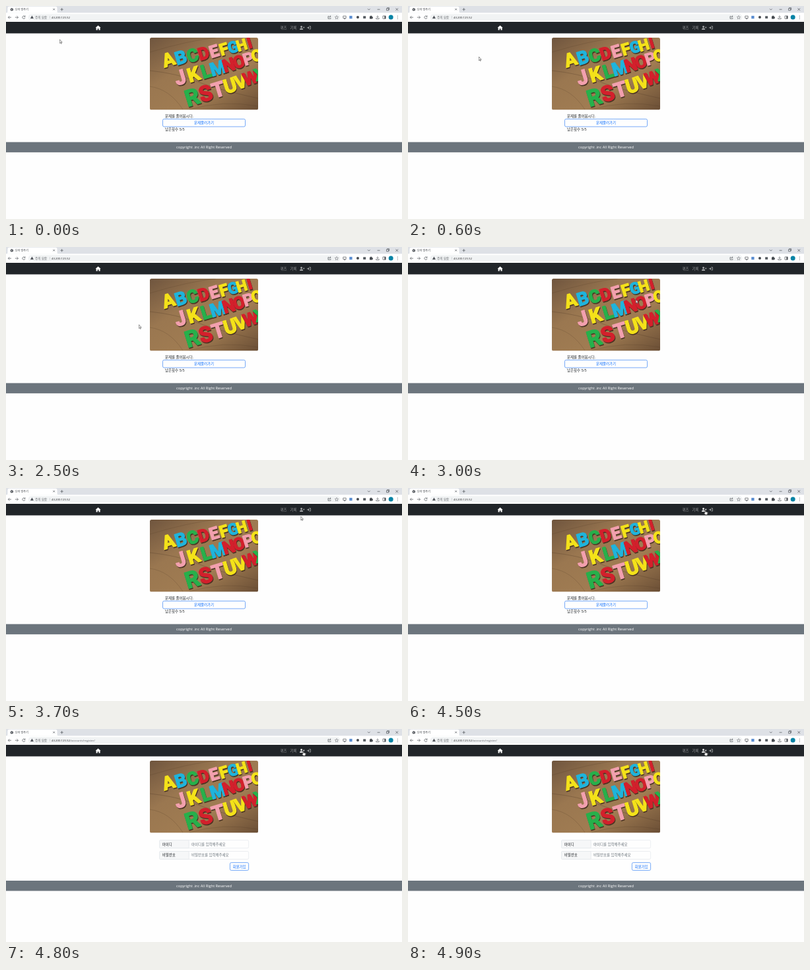
These frames come from a looping animation (600x323 px, 5 s). An HTML page:

```html
<!DOCTYPE html>
<html>
<head>
<meta charset="utf-8">
<title>단어 맞추기</title>
<style>
html, body { margin: 0; width: 100%; height: 100%; overflow: hidden; background: #fefefe; }
svg { display: block; width: 600px; height: 323px; }
text { font: 5.45px "Open Sans", "Noto Sans CJK KR", "Noto Sans CJK", sans-serif; fill: #212529; }
.mid { text-anchor: middle; }
.tab { font-size: 4.1px; fill: #45494d; }
.url { font-size: 4.3px; fill: #202124; }
.soft { fill: #6c757d; }
.blue { fill: #0d6efd; }
.link { fill: #a0a2a4; }
.line { fill: none; stroke: #50545a; stroke-width: .7; }
.btn { fill: #fefefe; stroke: #3d86f5; stroke-width: .7; }
.letter { font: 700 27px Roboto, sans-serif; text-anchor: middle; stroke-linejoin: round; stroke-width: 1.6; }

/* page states */
.home, .load, .done, .reg, .nav, .arrow, .hand, .lit, .shift, .move { animation: 5s step-end infinite; }
.home { animation-name: home; }
.load { animation-name: load; }
.done { animation-name: done; }
.reg { animation-name: reg; }
.nav { animation-name: nav; }
.shift { animation-name: shift; }
.arrow { animation-name: arrow; }
.hand { animation-name: hand; }
.lit { animation-name: lit; }
.move { animation-name: move; }
@keyframes home { 0% { visibility: visible } 94%, 100% { visibility: hidden } }
@keyframes load { 0% { visibility: hidden } 94% { visibility: visible } 96%, 100% { visibility: hidden } }
@keyframes done { 0% { visibility: hidden } 96%, 100% { visibility: visible } }
@keyframes reg { 0% { visibility: hidden } 94%, 100% { visibility: visible } }
@keyframes nav { 0% { visibility: visible } 94% { visibility: hidden } 96%, 100% { visibility: visible } }
@keyframes shift { 0% { transform: none } 94% { transform: translateY(-17.5px) } 96%, 100% { transform: none } }
@keyframes arrow { 0% { visibility: visible } 80%, 100% { visibility: hidden } }
@keyframes hand { 0% { visibility: hidden } 80%, 100% { visibility: visible } }
@keyframes lit { 0% { fill: #a0a2a4 } 80%, 100% { fill: #e4e5e6 } }

/* pointer route, advancing every 100 ms */
@keyframes move {
  0% { transform: translate(81px, 50.7px); animation-timing-function: steps(6) }
  12% { transform: translate(107px, 77px) }
  18% { transform: translate(108.3px, 78px) }
  20% { transform: translate(108.3px, 78px); animation-timing-function: steps(4) }
  28% { transform: translate(112px, 78px) }
  30% { transform: translate(112px, 78px); animation-timing-function: steps(4) }
  38% { transform: translate(117.3px, 79px) }
  40% { transform: translate(117.3px, 79px); animation-timing-function: steps(5) }
  50% { transform: translate(201px, 117.7px) }
  52% { transform: translate(208.5px, 117px); animation-timing-function: steps(6) }
  64% { transform: translate(413px, 61px); animation-timing-function: steps(2) }
  68% { transform: translate(446px, 47.8px) }
  70% { transform: translate(446px, 47.8px); animation-timing-function: steps(2) }
  74% { transform: translate(446.3px, 43px); animation-timing-function: steps(3) }
  80% { transform: translate(448.5px, 31px) }
  82% { transform: translate(448.5px, 32.3px) }
  86%, 100% { transform: translate(448.5px, 33px) }
}
</style>
</head>
<body>
<svg viewBox="0 0 600 323">
  <defs>
    <linearGradient id="wood" x1="0" y1="0" x2="1" y2="1">
      <stop offset="0" stop-color="#6f553e"/>
      <stop offset=".35" stop-color="#9a7750"/>
      <stop offset=".65" stop-color="#a07c52"/>
      <stop offset="1" stop-color="#6a4e35"/>
    </linearGradient>
    <clipPath id="frame"><rect width="164" height="109.5" rx="2.6"/></clipPath>
  </defs>
  <rect width="600" height="323" fill="#fefefe"/>

  <!-- browser -->
  <rect width="600" height="10.5" fill="#dee1e6"/>
  <path d="M0 10.5Q2.5 10.5 2.5 8V3Q2.5 .8 5 .8H75Q77.5 .8 77.5 3V8Q77.5 10.5 80 10.5Z" fill="#fff"/>
  <circle cx="8.8" cy="5.2" r="2.3" fill="#53575c"/>
  <path d="M7.2 4.5l1.4.5.2 1.3M9.2 3.6l1.2 1" fill="none" stroke="#fff" stroke-width=".6"/>
  <text class="tab home" x="14" y="6.5">단어 맞추기</text>
  <text class="tab load" x="14" y="6.5" style="font-size:3.7px">43.200.125.52/accounts/register</text>
  <text class="tab done" x="14" y="6.5">단어 맞추기</text>
  <path class="line" d="M71.3 3.8l2.6 2.6m0-2.6l-2.6 2.6M82.4 5.2h4.4M84.6 3v4.4M548 4.2l1.8 1.8 1.8-1.8M562.6 5.2h4M576.6 3.7h3v3h-3ZM577.6 3.7v-1h3v3h-1M590.5 3.3l3.6 3.6m0-3.6l-3.6 3.6"/>
  <rect y="10.5" width="600" height="13.5" fill="#fff"/>
  <rect x="33.5" y="12.3" width="473" height="9.6" rx="4.8" fill="#f1f3f4"/>
  <path class="line" d="M8 17.2H3.4m2-2.1l-2.1 2.1 2.1 2.1M13.8 17.2h4.6m-2-2.1l2.1 2.1-2.1 2.1"/>
  <g class="nav"><path class="line" d="M28.6 15.8a2.1 2.1 0 1 0 .4 1.9M29 14.5v1.7h-1.8"/></g>
  <g class="load"><path class="line" d="M25.2 15.4l3.6 3.6m0-3.6l-3.6 3.6"/></g>
  <path d="M39.4 14.6l2.5 4.5h-5Z" fill="#50545a"/>
  <text class="url" x="44" y="18.8" style="font-size:4.6px;fill:#5f6368">주의 요함</text>
  <path d="M66.4 15v4.2" stroke="#b5b8bc" stroke-width=".5"/>
  <text class="url" x="69" y="18.7">43.200.125.52<tspan class="reg" fill="#5f6368">/accounts/register/</tspan></text>
  <path class="line" d="M489.6 15.6h-1.6v3.6h4v-1.3M489.6 17.7q.2-2 2.4-2m-1-1.1l1.2 1.1-1.2 1.1"/>
  <path class="line" d="M501 14.6l.8 1.7 1.8.2-1.3 1.3.3 1.8-1.6-.9-1.6.9.3-1.8-1.3-1.3 1.8-.2Z" style="stroke-width:.5"/>
  <path class="line" d="M510.8 15.2h4.4v3.2h-4.4ZM512 19.6h2.4M571 15h4.2v4.2H571ZM563 14.4v3.2m-1.5-1.4l1.5 1.5 1.5-1.5M560.8 18v1.5h4.4V18"/>
  <rect x="520.3" y="14.9" width="4.3" height="4.3" fill="#5a8dd0"/>
  <circle cx="533" cy="17.1" r="2" fill="#464a50"/>
  <rect x="541.2" y="15.3" width="4" height="3.6" fill="#555a60"/>
  <path d="M551 15.5h1.2a.9.9 0 0 1 1.8 0h1.2v1.3a.9.9 0 0 1 0 1.8v1H551Z" fill="#464a50"/>
  <path d="M573.4 15h1.8v4.2h-1.8Z" fill="#464a50"/>
  <circle cx="583.2" cy="17.1" r="3.5" fill="#0783a5"/>
  <path d="M593.3 15v.1m0 2v.1m0 2v.1" stroke="#50545a" stroke-width=".9" stroke-linecap="round"/>

  <!-- navigation -->
  <g class="nav">
    <rect y="24" width="600" height="17.5" fill="#212529"/>
    <path d="M139.6 29.4l4 3.6h-1v3.4h-2.1v-2.2h-1.8v2.2h-2.1V33h-1Z" fill="#fff"/>
    <text class="link" x="415.5" y="34.8">퀴즈</text>
    <text class="link" x="430.6" y="34.8">기록</text>
    <path class="lit" d="M447.6 30a1.5 1.5 0 1 1-.01 0ZM445 36q0-2.5 1.8-2.5h1.6q1.8 0 1.8 2.5ZM450 32.2h.8v-.9h.7v.9h.9v.7h-.9v.9h-.7v-.9H450Z"/>
    <path class="link" d="M456.3 32.3h1.7v-1.4l2 2-2 2v-1.4h-1.7ZM459.5 30.3h1.2q1.2 0 1.2 1.2v2.8q0 1.2-1.2 1.2h-1.2v-.8h1q.6 0 .6-.6v-2.2q0-.6-.6-.6h-1Z"/>
  </g>

  <g class="shift">
    <g transform="translate(218 48)" clip-path="url(#frame)">
      <rect width="164" height="109.5" fill="url(#wood)"/>
      <g fill="none" stroke="#523c29" opacity=".45">
        <path d="M0 50Q40 54 70 66T164 92" stroke-width=".7"/>
        <path d="M0 74Q30 78 50 109" stroke-width=".5"/>
        <path d="M0 22Q60 4 100 0" stroke-width=".5"/>
        <path d="M60 109Q110 94 164 104" stroke-width=".5"/>
      </g>
      <g id="letters"></g>
    </g>

    <g class="reg">
      <g fill="#fefefe" stroke="#dfe3e7" stroke-width=".6">
        <rect x="232.6" y="168.6" width="135" height="12" rx="1.8"/>
        <rect x="232.6" y="168.6" width="44.6" height="12" rx="1" fill="#f6f7f8"/>
        <rect x="232.6" y="185.5" width="135" height="12" rx="1.8"/>
        <rect x="232.6" y="185.5" width="44.6" height="12" rx="1" fill="#f6f7f8"/>
      </g>
      <text x="236.8" y="176.5">아이디</text>
      <text class="soft" x="281" y="176.5">아이디를 입력해주세요</text>
      <text x="236.8" y="193.4">비밀번호</text>
      <text class="soft" x="281" y="193.4">비밀번호를 입력해주세요</text>
      <rect class="btn" x="339.4" y="202.6" width="28.2" height="11.8" rx="2"/>
      <text class="mid blue" x="353.5" y="210.5">회원가입</text>
    </g>
  </g>

  <g class="home">
    <text x="241" y="169.2">문제를 풀어봅시다.</text>
    <rect class="btn" x="237.5" y="171.4" width="125" height="11.6" rx="2"/>
    <text class="mid blue" x="300" y="179.2">문제풀러가기</text>
    <text x="241" y="188.8">남은횟수 5/5</text>
    <rect y="206.4" width="600" height="15.5" fill="#6c757d"/>
    <text class="mid" x="300" y="216.2" style="font-size:5.66px;fill:#fff">copyright .inc All Right Reserved</text>
  </g>
  <g class="done">
    <rect y="230" width="600" height="15.5" fill="#6c757d"/>
    <text class="mid" x="300" y="239.9" style="font-size:5.66px;fill:#fff">copyright .inc All Right Reserved</text>
  </g>

  <g class="move" fill="#fff" stroke="#1c1c1c" stroke-width=".5" stroke-linejoin="round">
    <path class="arrow" d="M.3 0V5.7L1.6 4.5 2.5 6.5 3.3 6.1 2.4 4.2H4.2Z"/>
    <path class="hand" d="M1.4.8Q2-.2 2.6.8V3L5 3.6Q5.6 3.9 5.4 5L4.8 7.6H2L.1 5Q0 4.1 1.4 4.7Z"/>
  </g>
</svg>
<script>
const colors = { y: '#f4e21a', b: '#1fb4dc', g: '#27b04b', r: '#d3202c', p: '#f2a0ae' };
// text, tints, first centre, last centre, first and last size
const rows = [
  ['ABCDEFGHI', 'ybgrpybyr', [28, 33], [151, 8], 28, 22],
  ['JKLMNOPQ', 'pygbrrpy', [46, 60], [162, 27], 30, 24],
  ['RSTUVWX', 'grpyyrg', [64, 90], [166, 55], 34, 25]
];
const mix = (a, b, k) => a + (b - a) * k;
const group = document.getElementById('letters');

function addLetter(char, x, y, size, color) {
  const el = document.createElementNS('http://www.w3.org/2000/svg', 'text');
  el.textContent = char;
  el.setAttribute('class', 'letter');
  el.setAttribute('transform', `translate(${x} ${y}) rotate(-17)`);
  el.setAttribute('y', size * .355);
  el.style.cssText = `font-size:${size}px;fill:${color};stroke:${color}`;
  group.append(el);
}

for (const [chars, tints, from, to, big, small] of rows) {
  [...chars].forEach((char, i) => {
    const k = i / (chars.length - 1);
    const bend = k * (1.25 - .25 * k);
    const x = mix(from[0], to[0], bend), y = mix(from[1], to[1], k);
    const size = mix(big, small, k);
    addLetter(char, x + .9, y + 1.5, size, '#4a3423');
    addLetter(char, x, y, size, colors[tints[i]]);
  });
}
</script>
</body>
</html>
```
